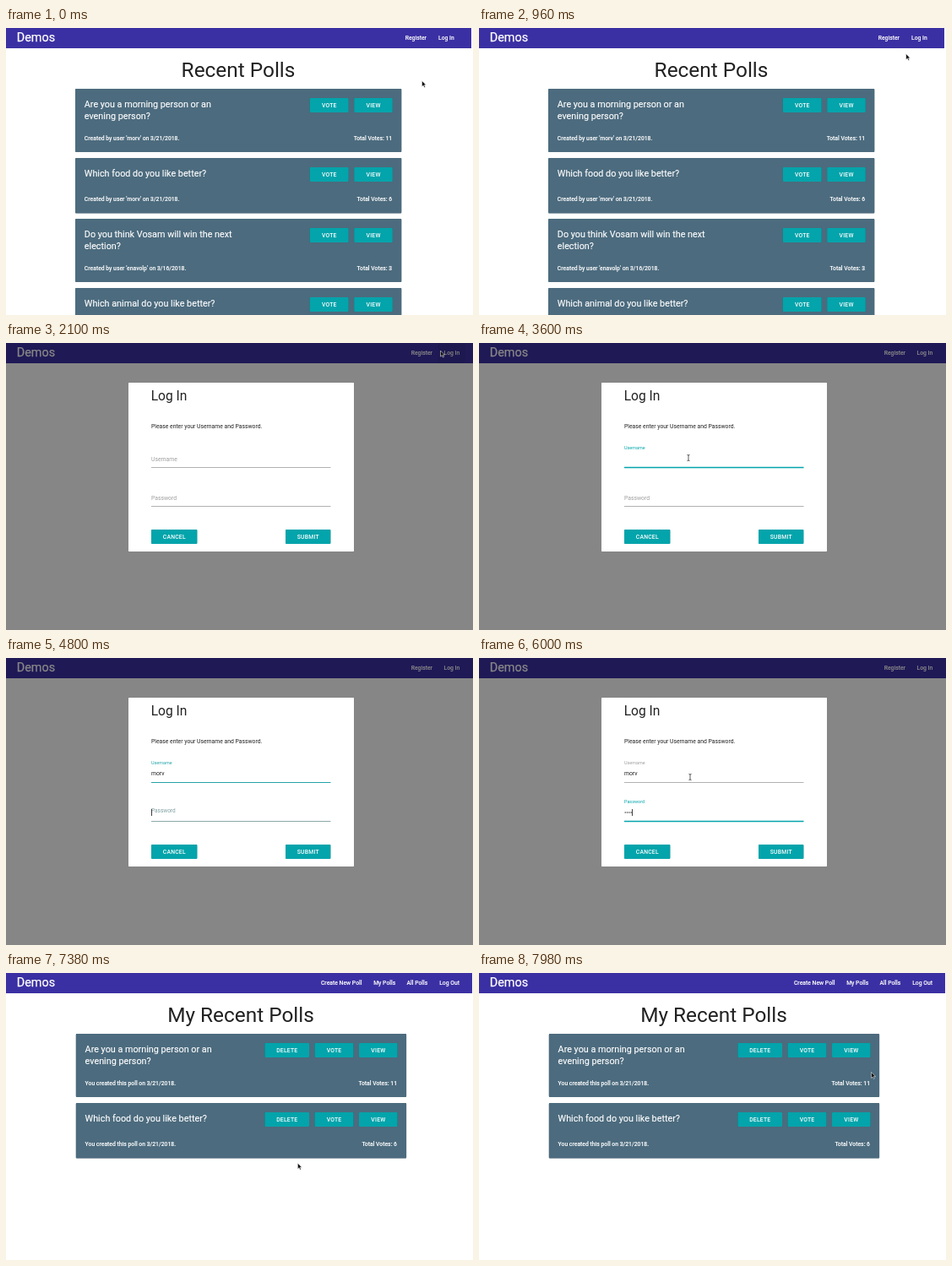
An HTML page that plays this animation: 553x340 px, repeating every 8000 ms.

```html
<!DOCTYPE html>
<html lang="en">
<head>
<meta charset="utf-8">
<title>Polls</title>
<style>
  html, body { margin: 0; width: 100%; height: 100%; overflow: hidden; background: #fff; }
  svg { display: block; width: 553px; height: 340px; font-family: Roboto, sans-serif; font-size: 6.8px; }
  text { white-space: pre; }
  .btn { fill: #03a4ab; filter: drop-shadow(0 .8px .4px rgba(0,0,0,.3)); }
  .btnText { fill: #fff; font-weight: 500; letter-spacing: .23px; text-anchor: middle; }
  .card { fill: #4c6b7e; filter: drop-shadow(0 .9px .5px rgba(0,0,0,.35)); }
  .logo { fill: #fff; font-size: 14.4px; stroke: #fff; stroke-width: .25px; }
  .title { fill: #fff; font-size: 10.8px; stroke: #fff; stroke-width: .15px; }
  .small { fill: #fff; font-weight: 500; font-size: 6.8px; stroke: #fff; stroke-width: .1px; }
  .head { fill: #212121; font-size: 24.4px; text-anchor: middle; }
  .end { text-anchor: end; }
</style>
</head>
<body>
<svg id="stage" viewBox="0 0 553 340"></svg>
<script>
const LOOP = 8000;
const OPEN = 2100, FOCUS = 3180, TAB = 4740, BLUR = 6600, DONE = 7380;
const USER = 'morv';
const TYPED = [4200, 4320, 4440, 4500];
const DOTS = [5220, 5400, 5640, 5820];
const TEAL = [3, 164, 171], GREY = [158, 158, 158];

const text = (x, y, s, cls = '', more = '') => `<text x="${x}" y="${y}" class="${cls}" ${more}>${s}</text>`;
const rect = (x, y, w, h, more = '') => `<rect x="${x}" y="${y}" width="${w}" height="${h}" ${more}/>`;

function button(x, y, w, label, id = '') {
  return rect(x, y, w, 17, `rx="1" class="btn" ${id && `id="${id}"`}`) +
    text(x + w / 2 + .1, y + 10.8, label, 'btnText');
}

function card(x, y, w, lines, made, votes, buttons) {
  const h = lines.length > 1 ? 75 : 65.5, right = x + w - 10.5;
  let out = rect(x, y, w, h, 'rx="1" class="card"');
  lines.forEach((s, i) => out += text(x + 10.8, y + 21.9 + i * 14.5, s, 'title'));
  out += text(x + 10.8, y + h - 14.5, made, 'small') + text(right - .6, y + h - 14.5, 'Total Votes: ' + votes, 'small end');
  let edge = right;
  for (const [label, bw] of buttons) {
    out += button(edge - bw, y + 11, bw, label);
    edge -= bw + 6.5;
  }
  return out;
}

function header(w, items) {
  return rect(0, 0, w, 24, 'fill="#3b30a3" style="filter:drop-shadow(0 .9px .6px rgba(0,0,0,.4))"') +
    text(12.8, 16.4, 'Demos', 'logo') +
    items.map(([x, s]) => text(x, 14, s, 'small end')).join('');
}

const hover = (id, x, dark) => rect(x, 0, 32.5, 24, `id="${id}" fill="#000" opacity="${dark}"`);

function field(id, y, label) {
  return `<text id="${id}Label" x="172">${label}</text>` +
    `<line id="${id}Line" x1="172" x2="384.5" y1="${y}" y2="${y}"/>`;
}

const base = [['VIEW', 45.6], ['VOTE', 46]];
const own = [...base, ['DELETE', 52.6]];
const made = (who, date) => `Created by user '${who}' on ${date}.`;
const q1 = ['Are you a morning person or an', 'evening person?'];
const q2 = ['Which food do you like better?'];

const recent = header(551, [[498, 'Register'], [530.8, 'Log In']]) + hover('navHover', 505, .13) +
  text(275, 58, 'Recent Polls', 'head') +
  card(82, 72, 386.3, q1, made(USER, '3/21/2018'), 11, base) +
  card(82, 154, 386.3, q2, made(USER, '3/21/2018'), 6, base) +
  card(82, 226, 386.3, ['Do you think Vosam will win the next', 'election?'], made('enavolp', '3/16/2018'), 3, base) +
  card(82, 308, 386.3, ['Which animal do you like better?'], made(USER, '3/16/2018'), 4, base);

const login = header(553, [[505, 'Register'], [537.3, 'Log In']]) + hover('dimHover', 511.5, .06) +
  rect(0, 0, 553, 340, 'fill="#000" opacity=".475"') +
  rect(145, 47, 267, 200, 'rx=".8" fill="#fff"') +
  text(171.7, 68.3, 'Log In', '', 'font-size="15.6" fill="#212121"') +
  text(172, 101.2, 'Please enter your Username and Password.', '', 'fill="#212121"') +
  field('user', 147.5, 'Username') + field('pass', 193.5, 'Password') +
  text(172, 139, '', '', 'id="name" fill="#212121"') +
  DOTS.map((_, i) => `<circle class="dot" cx="${173.2 + i * 2.3}" cy="183" r=".7" fill="#212121"/>`).join('') +
  rect(0, 0, .8, 8, 'id="caret" fill="#111"') +
  button(172, 221, 54.4, 'CANCEL') + button(331, 221, 53.4, 'SUBMIT', 'submit');

const mine = header(552, [[421.5, 'Create New Poll'], [461.3, 'My Polls'], [499.3, 'All Polls'], [537, 'Log Out']]) +
  text(278, 58, 'My Recent Polls', 'head') +
  card(82.8, 72, 391.3, q1, 'You created this poll on 3/21/2018.', 11, own) +
  card(82.8, 154, 391.3, q2, 'You created this poll on 3/21/2018.', 6, own);

const pointers =
  '<path id="arrow" d="M0 0V7L1.7 5.5L2.8 8L4 7.5L2.9 5.1H5Z" fill="#111" stroke="#fff" stroke-width=".5"/>' +
  '<path id="hand" d="M1.5 0Q2.4 0 2.4 1V3L5.6 3.7Q6.2 4 5.9 5.2L5 8H2L-.3 5Q-.2 4 .7 4.6V1Q.7 0 1.5 0Z" fill="#fff" stroke="#111" stroke-width=".7"/>' +
  '<path id="beam" d="M-1.5 -3.6Q0 -3.6 0 -2.6Q0 -3.6 1.5 -3.6M0 -2.8V2.8M-1.5 3.6Q0 3.6 0 2.6Q0 3.6 1.5 3.6" fill="none" stroke="#333" stroke-width=".8"/>';

document.getElementById('stage').innerHTML = rect(0, 0, 553, 340, 'fill="#fff"') +
  `<g id="recent">${recent}</g><g id="login">${login}</g><g id="mine">${mine}</g>` + pointers;

const $ = id => document.getElementById(id);
const dots = document.querySelectorAll('.dot');
const show = (el, on) => el.style.display = on ? '' : 'none';
const set = (el, attrs) => { for (const k in attrs) el.setAttribute(k, attrs[k]); };
const ramp = (t, a, b) => Math.min(1, Math.max(0, (t - a) / (b - a)));
const ease = p => p * p * (3 - 2 * p);
const mix = (a, b, p) => a + (b - a) * p;
const blend = (a, b, p) => `rgb(${a.map((v, i) => Math.round(mix(v, b[i], p)))})`;
const count = (times, t) => times.filter(v => t >= v).length;

// start, end, x0, y0, x1, y1
const MOVES = [
  [0, 1700, 492.5, 62.5, 514.5, 9],
  [2460, 2960, 514.5, 9, 248, 136],
  [5940, 6000, 248, 136, 250, 141],
  [6000, 6600, 250, 141, 344.5, 226],
  [7350, 7960, 344.5, 226, 464.5, 117.5]
];

function pointerAt(t) {
  const m = MOVES.filter(v => t >= v[0]).pop();
  const p = ease(ramp(t, m[0], m[1]));
  return [mix(m[2], m[4], p), mix(m[3], m[5], p)];
}

function drawField(id, y, t, on, off) {
  const up = ease(ramp(t, on, on + 200));
  const lit = ramp(t, on, on + 300) * (1 - ramp(t, off, off + 300));
  const color = blend(GREY, TEAL, lit);
  set($(id + 'Label'), { y: y - 8 - 13.4 * up, 'font-size': mix(6.8, 5.44, up), fill: color });
  set($(id + 'Line'), { stroke: color, 'stroke-width': mix(.8, 1.3, lit) });
}

function caretOn(t) {
  if (t < FOCUS || t >= BLUR) return false;
  return t < 3600 || t >= 4020;
}

function draw(t) {
  show($('recent'), t < OPEN);
  show($('login'), t >= OPEN && t < DONE);
  show($('mine'), t >= DONE);

  show($('navHover'), t >= 1650);
  show($('dimHover'), t < 2560);
  drawField('user', 147.5, t, FOCUS, TAB);
  drawField('pass', 193.5, t, TAB, BLUR);

  const letters = count(TYPED, t), marks = count(DOTS, t);
  $('name').textContent = USER.slice(0, letters);
  dots.forEach((d, i) => show(d, i < marks));
  show($('caret'), caretOn(t));
  const inPass = t >= TAB;
  const width = !inPass && letters ? $('name').getComputedTextLength() : 0;
  set($('caret'), { x: 172 + (inPass ? marks * 2.3 : width), y: inPass ? 179 : 133 });

  const [x, y] = pointerAt(t);
  set($('submit'), { style: t >= BLUR - 80 ? 'fill:#10b0b8' : '' });
  const hidden = t >= TYPED[0] && t < 5940;
  const overField = t >= OPEN && t < DONE && x > 172 && x < 384 && y > 129 && y < 148;
  const kind = t >= 1620 && t < OPEN ? 'hand' : overField ? 'beam' : 'arrow';
  for (const id of ['arrow', 'hand', 'beam']) {
    show($(id), !hidden && id === kind);
    set($(id), { transform: `translate(${x.toFixed(2)} ${y.toFixed(2)})` });
  }
}

const start = performance.now();
function tick() {
  draw((performance.now() - start) % LOOP);
  requestAnimationFrame(tick);
}
tick();
</script>
</body>
</html>
```
